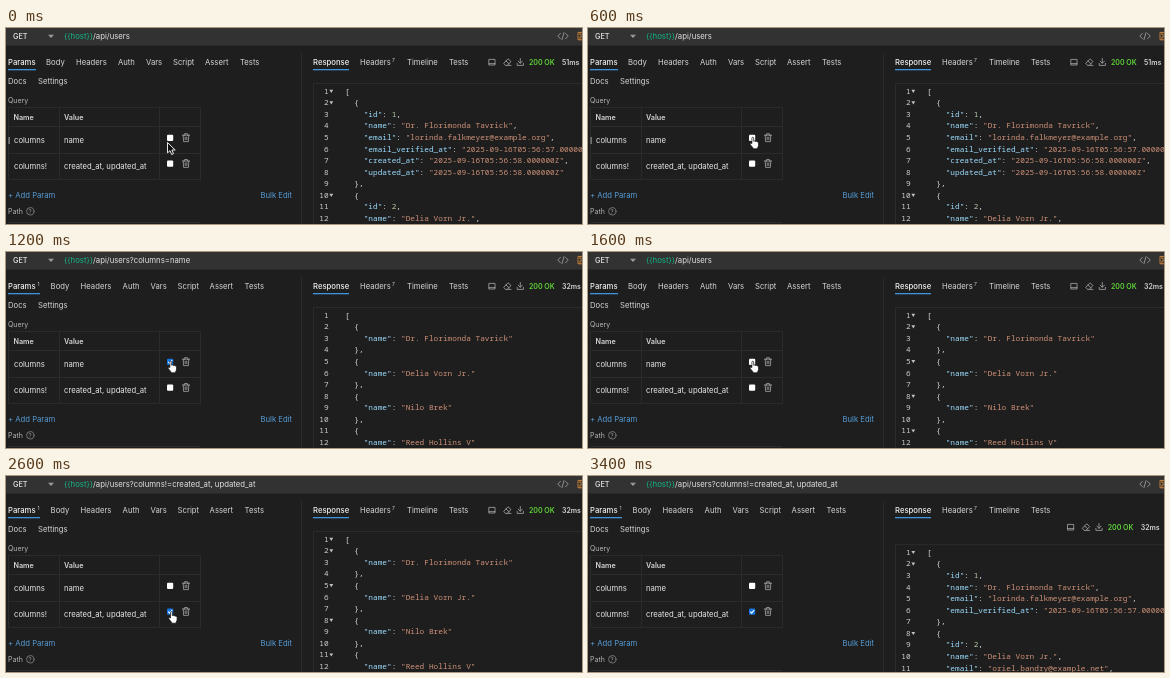
These frames come from a looping animation (576x196 px, 3600 ms). An HTML page:

```html
<!DOCTYPE html>
<html lang="en">
<head>
<meta charset="utf-8">
<title>Column filter demo</title>
<style>
html, body { margin: 0; width: 100%; height: 100%; overflow: hidden; background: #1e1e1e; }
svg { display: block; width: 576px; height: 196px; }
text { font: 7.7px Inter, sans-serif; fill: #d6d6d6; white-space: pre; }
.code text { font: 500 7.78px "Noto Sans Mono", monospace; }
.icon { fill: none; stroke: #a8a8a8; stroke-width: .8; stroke-linejoin: round; stroke-linecap: round; }
</style>
</head>
<body>
<svg id="stage" viewBox="0 0 576 196" xmlns="http://www.w3.org/2000/svg"></svg>
<script>
const NS = "http://www.w3.org/2000/svg";
const stage = document.getElementById("stage");
const LOOP = 3600, STEP = 200;
const EDGE = "#2b2b2b", ACCENT = "#3d94dc";

function add(parent, tag, attrs = {}, content = "") {
  const el = document.createElementNS(NS, tag);
  for (const key in attrs) el.setAttribute(key, attrs[key]);
  if (content) el.textContent = content;
  parent.appendChild(el);
  return el;
}
const group = (parent = stage, attrs) => add(parent, "g", attrs);
const rect = (p, x, y, width, height, fill) => add(p, "rect", { x, y, width, height, fill });
const path = (p, d, attrs) => add(p, "path", { d, ...attrs });
// y is the middle of the line
const label = (p, x, y, str, style = "") => add(p, "text", { x, y: y + 2.8, style }, str);
const show = (el, on) => el.setAttribute("visibility", on ? "inherit" : "hidden");
const move = (el, x, y) => el.setAttribute("transform", `translate(${x} ${y})`);

// URL bar
rect(stage, 0, 0, 576, 17.5, "#323232");
label(stage, 7, 8, "GET", "fill:#e6e6e6;font-size:7.3px;font-weight:500");
path(stage, "M42 6.7h6l-3 3.4z", { fill: "#9a9a9a" });
const url = add(stage, "text", { x: 58, y: 10.8, style: "font-size:7.75px" });
add(url, "tspan", { style: "fill:#12b886" }, "{{host}}");
const query = add(url, "tspan", { style: "fill:#e2e2e2" });
path(stage, "M554.4 5.4l-2.6 2.7 2.6 2.7M559.6 5.4l2.6 2.7-2.6 2.7M558 4.6l-2 7", { class: "icon" });
path(stage, "M577 4.4h-5v7.4h5M574 4.4v2.4h4M574 11.8v-3h4", { class: "icon", style: "stroke:#e0913a" });

// Request tabs
label(stage, 2, 34, "Params", "fill:#f2f2f2;font-weight:500");
const badge = label(stage, 31.4, 31, "1", "font-size:5px");
const underline = rect(stage, 2, 41, 28, 1.3, ACCENT);
const tabs = group();
[[40, "Body"], [70, "Headers"], [112, "Auth"], [140, "Vars"], [167, "Script"], [199, "Assert"], [234, "Tests"]]
  .forEach(([x, name]) => label(tabs, x, 34, name));
label(stage, 2, 53, "Docs");
label(stage, 32, 53, "Settings");
label(stage, 2, 72, "Query", "font-size:7px;fill:#b5b5b5");

// Parameter table
path(stage, "M2.5 79.5H194.5V151.5H2.5zM2.5 98.5H194.5M2.5 125.5H194.5M53.5 79.5V151.5M153.5 79.5V151.5",
  { fill: "none", stroke: EDGE });
label(stage, 7.5, 89, "Name", "font-size:7.2px;font-weight:600");
label(stage, 58, 89, "Value", "font-size:7.2px;font-weight:600");

function paramRow(y, name, value, boxY) {
  const g = group();
  label(g, 8, y, name, "fill:#e6e6e6");
  label(g, 58, y, value, "fill:#e6e6e6");
  const box = add(g, "rect", { x: 161, y: boxY - 3.1, width: 6.2, height: 6.2, rx: 1 });
  const tick = path(g, `M162.3 ${boxY}l1.4 1.6 2.5-3.2`, { fill: "none", stroke: "#fff", "stroke-width": 1.1 });
  path(g, `M176.4 ${boxY - 2.6}h7.2M178.6 ${boxY - 2.6}v-1.5h2.8v1.5M177.2 ${boxY - 2.6}l.4 6.4h4.8l.4-6.4M179.2 ${boxY - .7}v2.6M180.8 ${boxY - .7}v2.6`,
    { class: "icon" });
  const grip = rect(g, 2.6, y - 3, 1, 7, "#aaa");
  return (on, gripOn) => {
    box.setAttribute("fill", on ? "#1675e0" : "#fff");
    show(tick, on);
    show(grip, gripOn);
  };
}
const rowA = paramRow(112, "columns", "name", 109.8);
const rowB = paramRow(138, "columns!", "created_at, updated_at", 135.6);

label(stage, 2, 167.5, "+ Add Param", "fill:#569cd6");
label(stage, 254.5, 167.5, "Bulk Edit", "fill:#569cd6");
label(stage, 2, 183, "Path", "font-size:7px;fill:#b5b5b5");
add(stage, "circle", { cx: 24.3, cy: 183.3, r: 3.7, class: "icon", style: "stroke:#8a8a8a" });
label(stage, 22.6, 183.2, "?", "font-size:6px;fill:#9a9a9a");
rect(stage, 2, 194, 192, 1, EDGE);

// Response header
rect(stage, 295, 25, 1, 171, EDGE);
label(stage, 307, 34, "Response", "fill:#f2f2f2;font-weight:500");
rect(stage, 307, 41, 36, 1.3, ACCENT);
label(stage, 354, 34, "Headers");
label(stage, 386, 31, "7", "font-size:5px");
label(stage, 401, 34, "Timeline");
label(stage, 443, 34, "Tests");

const status = group();
path(status, "M483.2 31.4h5.8v5.6h-5.8zM483.2 35.6h5.8", { class: "icon" });
path(status, "M498 35l4-4.2 3 2.8-3.7 3.8h-1.5zM500 33l3 2.8M501.4 37.4h3.6", { class: "icon" });
path(status, "M514.3 30.5v4.6M512.2 33.2l2.1 2.1 2.1-2.1M511.2 35.4v2h6.2v-2", { class: "icon" });
label(status, 523, 34, "200 OK", "fill:#5fd338;font-size:7px;font-weight:600");
const timing = label(status, 556, 34, "51ms", "font-size:7px;font-weight:600");

// Response bodies
const LINE = 11.57, CHAR = 4.668;
const colors = { key: "#9cdcfe", str: "#ce9178", num: "#b5cea8", mark: "#dcdcdc" };

function paint(text, src) {
  const token = /("[^"]*")(?=:)|("[^"]*")|(\d+)|([^"\d]+)/g;
  for (const [part, key, str, num] of src.matchAll(token)) {
    const kind = key ? "key" : str ? "str" : num ? "num" : "mark";
    add(text, "tspan", { style: `fill:${colors[kind]}` }, part);
  }
}

function editor(top, lines) {
  const g = group(stage, { class: "code" });
  path(g, `M307.5 196V${top - 7.5}H576`, { fill: "none", stroke: EDGE });
  const folds = group(g);
  lines.forEach((src, i) => {
    const y = top + i * LINE;
    add(g, "text", { x: 322.6, y: y + 2.7, "text-anchor": "end", style: "fill:#d0d0d0" }, String(i + 1));
    const body = src.trimStart();
    const indent = src.length - body.length;
    paint(add(g, "text", { x: 339 + indent * CHAR, y: y + 2.7 }), body);
    if (/[\[{]$/.test(src)) path(folds, `M323.4 ${y - 1.3}h3.8l-1.9 3.2z`, { fill: "#c2c2c2" });
  });
  return (on, foldsOn) => {
    show(g, on);
    show(folds, foldsOn);
  };
}

const field = (name, value, end = ",") => `    "${name}": ${value}${end}`;
const quoted = s => `"${s}"`;
const stamp = sec => quoted(`2025-09-16T05:56:${sec}.000000Z`);
const people = ["Dr. Florimonda Tavrick", "Delia Vorn Jr.", "Nilo Brek", "Reed Hollins V"].map(quoted);
const mails = ["lorinda.falkmeyer@example.org", "oriel.bandry@example.net"].map(quoted);
const first = ["[", "  {", field("id", 1), field("name", people[0]), field("email", mails[0])];

const fullBody = editor(63, [
  ...first, field("email_verified_at", stamp(57)), field("created_at", stamp(58)),
  field("updated_at", stamp(58), ""), "  },", "  {", field("id", 2), field("name", people[1])
]);
const namesBody = editor(63, [
  "[", ...people.flatMap(p => ["  {", field("name", p, ""), "  },"])
].slice(0, 12));
const trimmedBody = editor(76.2, [
  ...first, field("email_verified_at", stamp(57), ""), "  },",
  "  {", field("id", 2), field("name", people[1]), field("email", mails[1])
]);

// Pointers, with the tip at the origin
const arrow = path(stage, "M0 0V10.4L2.5 8.2 4.2 12 6 11.2 4.4 7.5H7.7z",
  { fill: "#111", stroke: "#fff", "stroke-width": .9, "stroke-linejoin": "round" });
const hand = path(stage, "M1.3 6.4V1.1Q1.3 0 2.2 0T3.1 1.1V4Q4.3 3.3 4.9 4.3 6 3.7 6.5 4.7 7.9 4.4 7.9 5.8V8Q7.9 9.4 6.9 10.6V11.6H2.4V10.7L-.3 7.4Q-.8 6.5 0 6.1 .7 5.8 1.3 6.4z",
  { fill: "#fff", stroke: "#111", "stroke-width": .7, "stroke-linejoin": "round" });

// [time, x, y, is hand]
const trail = [
  [0, 161.5, 114.5, false], [200, 161.8, 113.5, false], [400, 162, 112, false],
  [600, 162.6, 109.2, true], [1800, 163.4, 120, false], [2000, 163.2, 133, true], [2200, 163.2, 135.6, true]
];

function draw(t) {
  const checkA = t >= 800 && t < 1400;
  const checkB = t >= 2400;
  const third = t >= 2800;
  const second = t >= 1200 && !third;

  query.textContent = "/api/users" + (checkA ? "?columns=name" : checkB ? "?columns!=created_at, updated_at" : "");
  const active = checkA || checkB;
  show(badge, active);
  underline.setAttribute("width", active ? 32 : 28);
  move(tabs, active ? 4.6 : 0, 0);
  rowA(checkA, t < 800);
  rowB(checkB, t >= 2000 && t < 2400);

  fullBody(t < 1200, t < 1200);
  namesBody(second, second && t >= 1400);
  trimmedBody(third, t >= 3000);
  timing.textContent = t < 1200 ? "51ms" : "32ms";
  move(status, third ? -3.3 : 0, third ? 17 : 0);

  const [, x, y, isHand] = trail.filter(p => p[0] <= t).pop();
  const visible = t < 3400;
  show(arrow, visible && !isHand);
  show(hand, visible && isHand);
  move(isHand ? hand : arrow, x, y);
}

const start = performance.now();
function tick() {
  const t = (performance.now() - start) % LOOP;
  draw(Math.floor(t / STEP) * STEP);
  requestAnimationFrame(tick);
}
tick();
</script>
</body>
</html>
```
